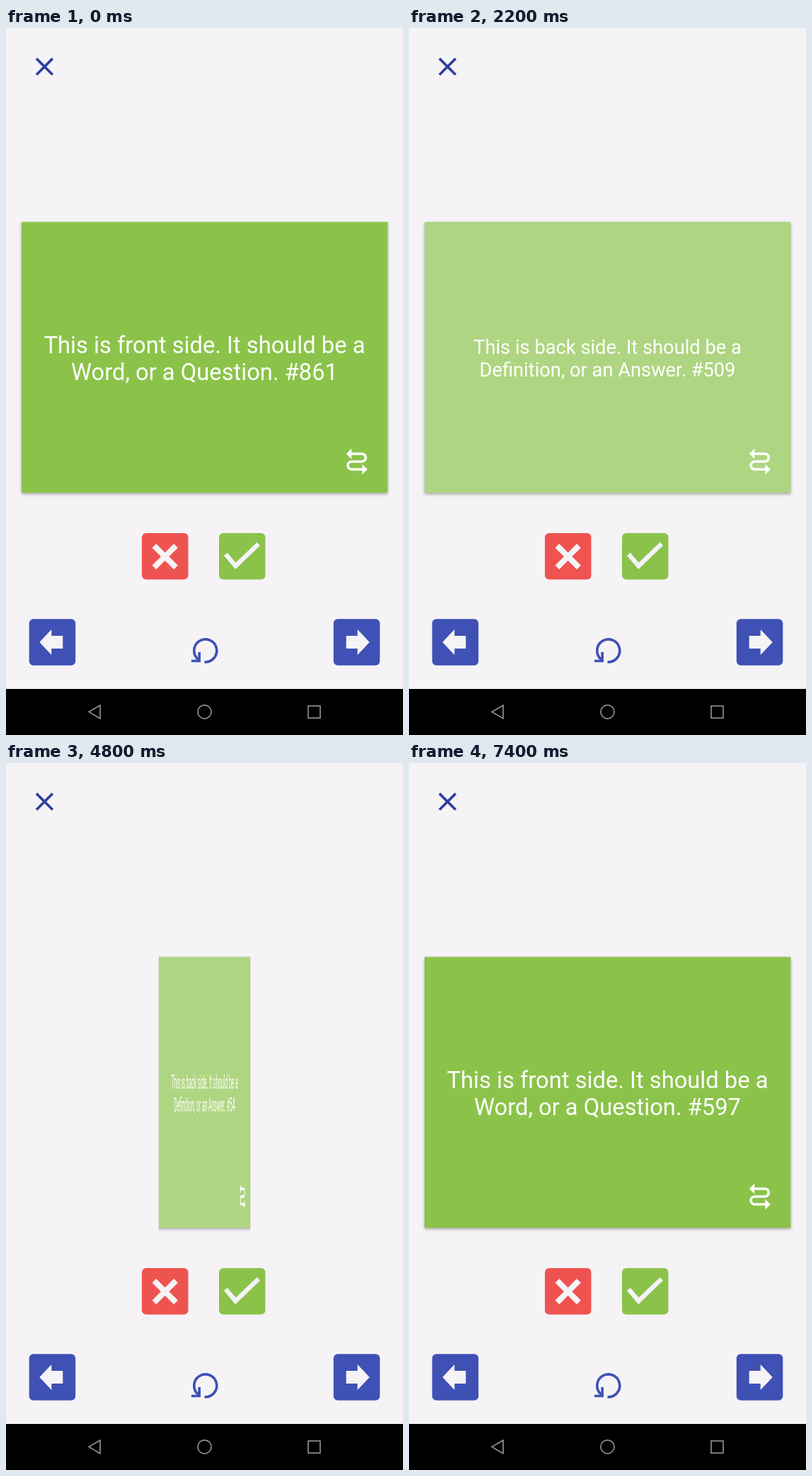
These frames come from a looping animation (561x998 px, 8 s). An HTML page:

```html
<!DOCTYPE html>
<html lang="en">
<head>
<meta charset="utf-8">
<title>Flash cards</title>
<style>
  html, body { margin: 0; width: 100%; height: 100%; overflow: hidden; background: #f5f3f6; }
  svg { display: block; }
  text { font-family: Roboto, sans-serif; text-anchor: middle; fill: #fff; }
  .side { filter: drop-shadow(0 2px 2px rgba(0, 0, 0, .32)); }
  .front { fill: #8bc34a; }
  .back { fill: #aed581; }
  .front text { font-size: 32.73px; }
  .back text { font-size: 27.27px; }
  .line { fill: none; stroke-width: 3.64; }
</style>
</head>
<body>
<svg width="561" height="998" viewBox="0 0 561 998">
  <defs>
    <path id="swap" class="line" stroke="#fff"
      d="M487 601H502.7a5.5 5.5 0 0 1 0 11H488.6a5.5 5.5 0 0 0 0 11H504"/>
    <path id="heads" fill="#fff" d="M480.8 601l7.4-7.2v14.4zM510.8 623l-7.4-7.2v14.4z"/>
    <g id="arrow">
      <rect x="32.7" y="834.3" width="65.5" height="65.5" rx="6" fill="#3f51b5"/>
      <path fill="#f5f3f6" d="M47.3 867L64.3 849V858H80.3V876H64.3V885z"/>
    </g>
  </defs>

  <path class="line" stroke="#303f9f" d="M43 43.1L65.9 66M65.9 43.1L43 66"/>
  <g id="strip"></g>

  <rect x="192" y="713" width="65.5" height="65.5" rx="6" fill="#ef5350"/>
  <path class="line" stroke="#f5f3f6" style="stroke-width:8" d="M209.4 730.8L240 761.4M240 730.8L209.4 761.4"/>
  <rect x="301" y="713" width="65.5" height="65.5" rx="6" fill="#8bc34a"/>
  <path class="line" stroke="#f5f3f6" style="stroke-width:6.4" d="M310.4 742.7L324.4 759.4L356.8 728.2"/>

  <use href="#arrow"/>
  <use href="#arrow" transform="matrix(-1 0 0 1 561 0)"/>
  <path class="line" stroke="#3f51b5" d="M262 893.5H273.2V881M272 891.6A16 16 0 1 1 280.5 894.9"/>

  <rect y="933" width="561" height="65"/>
  <g fill="none" stroke="#a0a0a0" stroke-width="1.5">
    <path d="M117 965.3L133 956V974.6z"/>
    <circle cx="280.5" cy="965.3" r="9.6"/>
    <rect x="427" y="957" width="17" height="17"/>
  </g>
</svg>
<script>
const PAGE = 561, LOOP = 8000, STEP = 100, SLIDE = 400, HALF_FLIP = 150;
const numbers = [861, 509, 54, 350, 597];
const slides = [813, 3800, 6205, 7000];
const flips = [1834, 3034, 4600, 5634];

const side = (name, lines, baseline, leading) => `<g class="side ${name}">
  <rect x="22" y="273.7" width="517.3" height="382.2" rx="1"/>
  ${lines.map((line, i) => `<text x="280.5" y="${baseline + i * leading}">${line}</text>`).join('')}
  <use href="#swap"/><use href="#heads"/></g>`;

const strip = document.getElementById('strip');
strip.innerHTML = numbers.map(n => '<g>' +
  side('front', ['This is front side. It should be a', `Word, or a Question. #${n}`], 458.7, 38.4) +
  side('back', ['This is back side. It should be a', `Definition, or an Answer. #${n}`], 459.6, 32) +
  '</g>').join('');
const cards = [...strip.children];

const clamp = x => Math.min(1, Math.max(0, x));
const easeInOut = x => (1 - Math.cos(Math.PI * clamp(x))) / 2;

function draw(t) {
  const page = slides.reduce((sum, start) => sum + easeInOut((t - start) / SLIDE), 0);
  let width = 1, turned = false;
  for (const start of flips) {
    const p = (t - start) / HALF_FLIP;
    if (p >= 1) turned = !turned;
    if (p > 0 && p < 2) width = p < 1 ? (1 - p) ** 2 : easeInOut(p - 1);
  }
  cards.forEach((card, i) => {
    const center = PAGE / 2 + (i - page) * PAGE;
    card.setAttribute('transform', `translate(${center}) scale(${width} 1) translate(${-PAGE / 2})`);
    card.style.display = Math.abs(i - page) < 1 ? '' : 'none';
    card.children[0].style.display = turned ? 'none' : '';
    card.children[1].style.display = turned ? '' : 'none';
  });
}

// The screen refreshes ten times a second.
function tick() {
  draw(Math.floor(performance.now() % LOOP / STEP) * STEP);
  requestAnimationFrame(tick);
}
tick();
</script>
</body>
</html>
```
